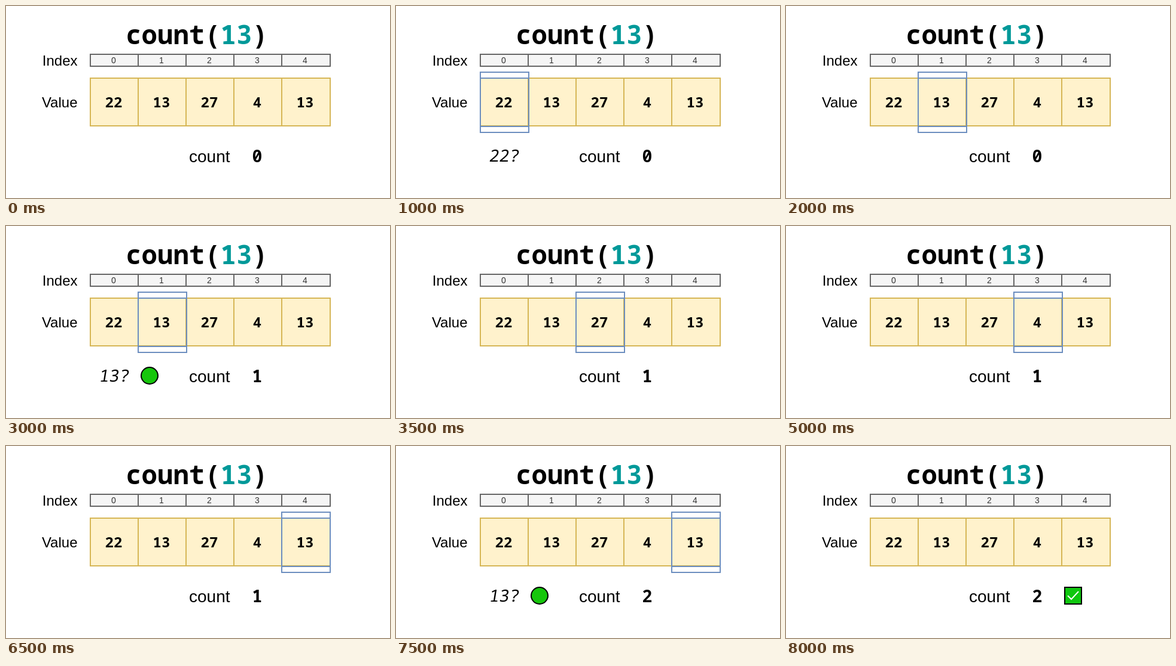
Write an HTML page that moves like this. It is 642 by 322 pixels and loops after 10 s.

```html
<!DOCTYPE html>
<html lang="en">
<head>
<meta charset="utf-8">
<title>count(13)</title>
<style>
html, body { margin: 0; width: 100%; height: 100%; overflow: hidden; background: #fff; }
svg { display: block; width: 642px; height: 322px; }
text { font-family: "Liberation Sans", Arial, sans-serif; }
.mono { font-family: "Noto Sans Mono", monospace; font-weight: 600; text-anchor: middle; }
.end { text-anchor: end; font-size: 24px; }
.index { font-size: 14px; fill: #333; text-anchor: middle; }
.value { font-size: 24px; }
.big { font-size: 28px; }
#ask { font-weight: 400; }
#frame { fill: none; stroke: #6c8ebf; stroke-width: 2; }
</style>
</head>
<body>
<svg viewBox="0 0 642 322">
  <text class="mono" x="319" y="64" font-size="44">count(<tspan fill="#099">13</tspan>)</text>
  <text class="end" x="119.5" y="100">Index</text>
  <text class="end" x="119.5" y="170">Value</text>
  <g id="cells"></g>
  <path id="frame" d="M141 111h81v101h-81zM141 121h81M141 202h81"/>
  <text id="ask" class="mono big" transform="translate(180 261) skewX(-9)"></text>
  <circle id="dot" cx="240" cy="251" r="14" stroke="#000" stroke-width="2"/>
  <text class="big" x="306" y="262">count</text>
  <text id="total" class="mono big" x="420" y="262"></text>
  <g id="done">
    <rect x="466" y="237" width="28" height="28" fill="#0fc70f" stroke="#000" stroke-width="2"/>
    <path d="M471 251l6 6 12-13" fill="none" stroke="#fff" stroke-width="2"/>
  </g>
</svg>
<script>
const values = [22, 13, 27, 4, 13], target = 13, loop = 10000, finish = 8000;
// When each cell is framed, questioned and answered.
const visits = [
  [1000, 1000, 1500],
  [2000, 2500, 3000],
  [3500, 4000, 4500],
  [5000, 5500, 6000],
  [6500, 7000, 7500]
];
const $ = id => document.getElementById(id);
const show = (id, on) => $(id).setAttribute('visibility', on ? 'visible' : 'hidden');
const box = (x, y, h, fill, stroke) =>
  `<rect x="${x}" y="${y}" width="81" height="${h}" fill="${fill}" stroke="${stroke}" stroke-width="2"/>`;

$('cells').innerHTML = values.map((v, i) => {
  const x = 141 + 80 * i;
  return box(x, 81, 20, '#f5f5f5', '#666') + box(x, 121, 80, '#fff2cc', '#d6b656') +
    `<text class="index" x="${x + 39}" y="96">${i}</text>` +
    `<text class="mono value" x="${x + 39}" y="170">${v}</text>`;
}).join('');

function draw(t) {
  const i = t < finish ? visits.findLastIndex(v => t >= v[0]) : -1;
  const active = i >= 0;
  const asked = active && t >= visits[i][1];
  const answered = active && t >= visits[i][2];
  show('frame', active);
  show('dot', answered);
  show('done', t >= finish);
  $('ask').textContent = asked ? values[i] + '?' : '';
  if (active) {
    $('frame').setAttribute('transform', `translate(${80 * i})`);
    $('dot').setAttribute('fill', values[i] === target ? '#16c60c' : '#e81224');
  }
  $('total').textContent = values.filter((v, k) => v === target && t >= visits[k][2]).length;
}

const start = performance.now();
function tick() {
  draw((performance.now() - start) % loop);
  requestAnimationFrame(tick);
}
draw(0);
requestAnimationFrame(tick);
</script>
</body>
</html>
```
